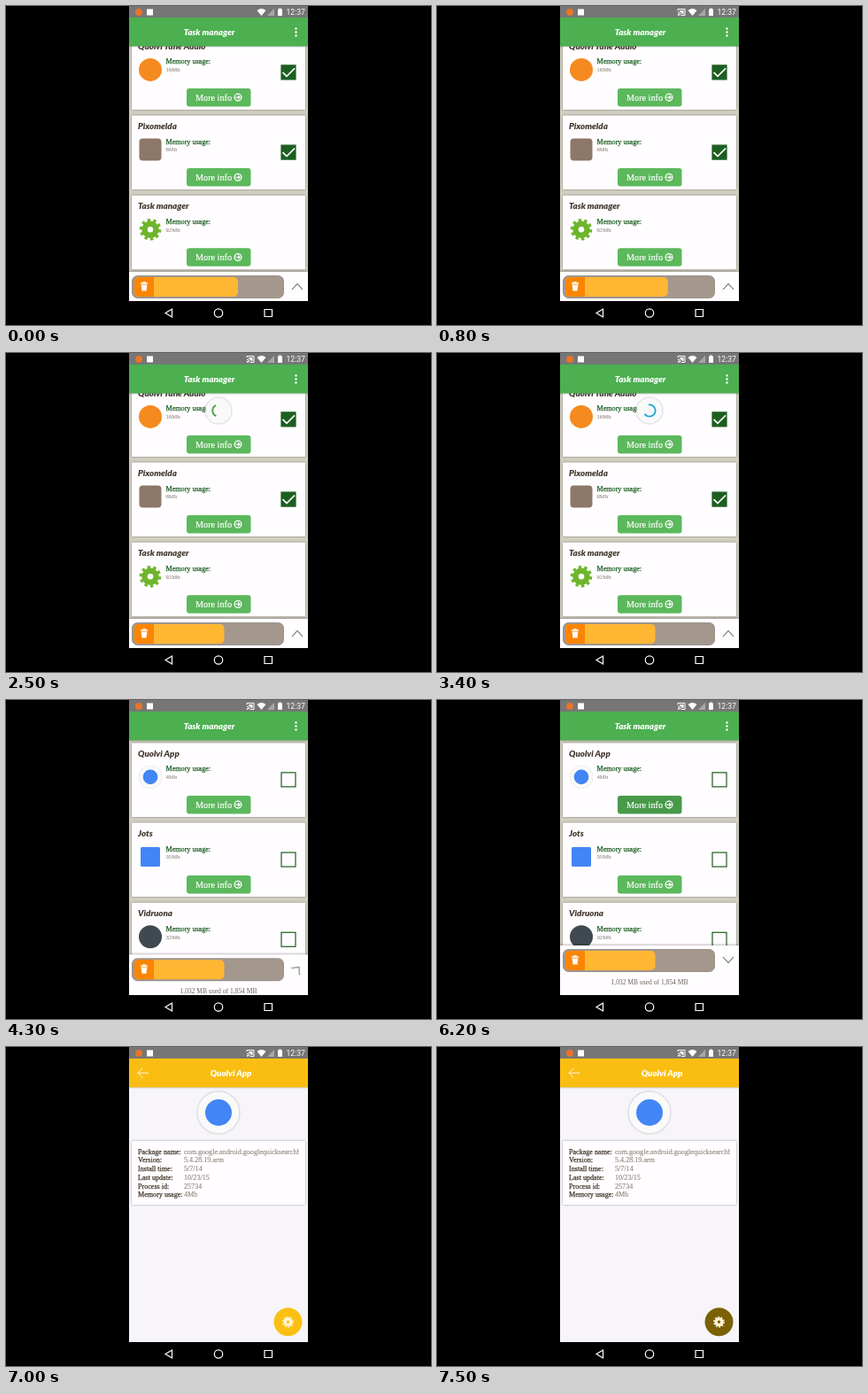
An HTML page that plays this animation: 480x360 px, repeating every 8000 ms.

```html
<!DOCTYPE html>
<html lang="en">
<head>
<meta charset="utf-8">
<title>Task manager</title>
<style>
html, body { margin: 0; width: 100%; height: 100%; overflow: hidden; background: #000; }
svg { display: block; width: 100vw; height: 100vh; }
text { font: 8.1px "Liberation Serif", serif; }
.title { font: italic 900 9.75px Lato, sans-serif; fill: #44382c; }
.bar-title { fill: #fff; text-anchor: middle; }
.clock { font: 8.6px Roboto, sans-serif; fill: #fff; }
.label { fill: #1b5e20; stroke: #1b5e20; stroke-width: .25; }
.size { font-size: 6.7px; fill: #9c948c; stroke: #9c948c; stroke-width: .15; }
.more { font-size: 10.2px; fill: #fff; stroke: #fff; stroke-width: .2; }
.total { font-size: 7.55px; fill: #6b635c; text-anchor: middle; }
.key { fill: #44382c; stroke: #44382c; stroke-width: .25; }
.value { fill: #938a82; stroke: #938a82; stroke-width: .15; }
.card { fill: #fffdff; filter: drop-shadow(0 .8px 1.2px #0006); }
.raised { filter: drop-shadow(0 .8px 1.2px #0005); }
.line { fill: none; stroke: #fff; }

.cast, .before, .after, .used, .spinner, .arc, .panel, .chevron, .pressed,
.page, .hero, .details, .fab { animation: 8s linear infinite; }

.cast { animation-name: cast; }
@keyframes cast { 0%, 1.2% { opacity: 0 } 1.25%, 100% { opacity: 1 } }

.used { animation-name: used; }
@keyframes used {
  0%, 8.2% { width: 117px; animation-timing-function: ease-in-out }
  17.5%, 100% { width: 101.5px }
}

.before { animation-name: before; }
@keyframes before { 0%, 44.3% { visibility: visible } 44.4%, 100% { visibility: hidden } }
.after { animation-name: after; }
@keyframes after { 0%, 44.3% { visibility: hidden } 44.4%, 100% { visibility: visible } }

.spinner { animation-name: spinner; transform-origin: 240px 65px; }
@keyframes spinner {
  0%, 17.5% { transform: scale(0) }
  19.6%, 43.1% { transform: scale(1) }
  45.6%, 100% { transform: scale(0) }
}
.arc { animation-name: arc; }
@keyframes arc {
  0%, 18.125% { stroke: #3f9b46; stroke-dasharray: 5 355; stroke-dashoffset: -25 }
  20% { stroke-dasharray: 18 342; stroke-dashoffset: -30 }
  26.875% { stroke-dasharray: 270 90; stroke-dashoffset: -90 }
  34.9% { stroke: #3f9b46 }
  35% { stroke: #1da4dc; stroke-dasharray: 10 350; stroke-dashoffset: -300 }
  42.5% { stroke-dasharray: 245 115; stroke-dashoffset: -350 }
  46.25%, 100% { stroke: #1da4dc; stroke-dasharray: 255 105; stroke-dashoffset: -480 }
}

.panel { animation-name: panel; }
@keyframes panel {
  0%, 50.6% { transform: none; animation-timing-function: ease-out }
  58.75%, 100% { transform: translateY(-23px) }
}
.chevron { animation-name: chevron; transform-origin: 329px 316.5px; }
@keyframes chevron {
  0%, 50.6% { transform: none; animation-timing-function: cubic-bezier(.6, 0, .5, 1) }
  58.75%, 100% { transform: rotate(180deg) }
}

.pressed { animation-name: pressed; }
@keyframes pressed { 0%, 76.9% { fill: #5cb85c } 77.4%, 100% { fill: #489a49 } }

.page { animation-name: page; }
@keyframes page { 0%, 79.75% { opacity: 0 } 81%, 100% { opacity: 1 } }
.hero { animation-name: hero; }
@keyframes hero {
  0%, 80.9% { transform: translate(163px, 87px) scale(.553); animation-timing-function: cubic-bezier(.4, 0, .2, 1) }
  87.5%, 100% { transform: translate(240px, 74px) scale(1) }
}
.details { animation-name: details; }
@keyframes details {
  0%, 80.9% { transform: translateY(222px); animation-timing-function: cubic-bezier(.4, 0, .2, 1) }
  87.5%, 100% { transform: none }
}
.fab { animation-name: fab; }
@keyframes fab { 0%, 88.1% { fill: #fbc013 } 93.4%, 100% { fill: #7b6106 } }
</style>
</head>
<body>
<svg viewBox="0 0 480 360">
  <defs>
    <clipPath id="screen"><path d="M139 0h202v333h-202z"/></clipPath>
    <clipPath id="row"><path d="M142 100h189v90h-189z"/></clipPath>
    <g id="badge">
      <circle r="23.5" fill="#fafafa" class="raised"/>
      <circle r="15" fill="#4285f4"/>
    </g>
    <g id="gear" fill="none" stroke="currentColor">
      <circle r="6.5" stroke-width="6.5"/>
      <circle r="10.7" stroke-width="3.2" pathLength="20" stroke-dasharray="1 1"/>
    </g>
  </defs>
  <rect width="480" height="360"/>
  <g clip-path="url(#screen)">
    <rect x="139" width="202" height="333" fill="#d1cdc0"/>
    <g class="before" id="before"></g>
    <g class="after" id="after"></g>

    <g class="panel">
      <rect x="139" y="300" width="202" height="60" fill="#fffdff" style="filter:drop-shadow(0 -1px 1px #0004)"/>
      <rect x="142.5" y="304.5" width="171" height="25" rx="6" fill="#a4978d" stroke="#97918b"/>
      <rect class="used" x="145" y="306" width="117" height="22" rx="5" fill="#ffb733"/>
      <path d="M167 306h-17q-5 0-5 5v12q0 5 5 5h17z" fill="#fb8500"/>
      <path d="M152.6 314.6h6.8l-.9 6.9h-5zM152 312.2h8v1.5h-8zM154.4 311h3.2v1.2h-3.2z" fill="#fff"/>
      <path class="chevron" d="M323 320l6-6.5 6 6.5" fill="none" stroke="#666" stroke-width="1.1"/>
      <text class="total" x="240" y="343.6">1,032 MB used of 1,854 MB</text>
    </g>

    <g class="spinner">
      <circle cx="240" cy="65" r="14.5" fill="#f9f9f9" class="raised"/>
      <circle class="arc" cx="240" cy="65" r="6.7" fill="none" stroke-width="1.8" pathLength="360" transform="rotate(-90 240 65)"/>
    </g>

    <rect x="139" y="13" width="202" height="32.5" fill="#4caf50" class="raised"/>
    <text class="title bar-title" x="229.5" y="32.7">Task manager</text>
    <g fill="#fff"><circle cx="327.5" cy="25.5" r="1.2"/><circle cx="327.5" cy="29.5" r="1.2"/><circle cx="327.5" cy="33.5" r="1.2"/></g>

    <g class="page">
      <rect x="139" y="13" width="202" height="320" fill="#f7f5f9"/>
      <g class="details" id="details"><rect class="card" x="142" y="106" width="196" height="72" rx="1"/></g>
      <use href="#badge" class="hero"/>
      <rect x="139" y="13" width="202" height="32.5" fill="#fabe12" class="raised"/>
      <path class="line" opacity=".85" d="M161 29.3h-12m5.5-5.5l-5.5 5.5 5.5 5.5"/>
      <text class="title bar-title" x="254" y="32.7">Quolvi App</text>
      <circle class="fab" cx="318.5" cy="310.3" r="16"/>
      <use href="#gear" color="#fff4d6" transform="translate(318.5 310.3) scale(.52)"/>
    </g>

    <rect x="139" width="202" height="13" fill="#767676"/>
    <circle cx="150" cy="7" r="4" fill="#e8742c"/>
    <rect x="159" y="3.5" width="7" height="7" fill="#fff"/>
    <g class="cast">
      <path class="line" d="M272 5.5v-2h8v7h-4M272 7.3q3 0 3.2 3.2"/>
      <path d="M272 9h1.7v1.8H272zM274 5h4.5v4H277q-1-2-3-2.500z" fill="#fff"/>
    </g>
    <path d="M283.5 5q5-4 10 0l-5 6z" fill="#fff"/>
    <path d="M303 2.7v8.3h-8z" fill="#a6a6a6"/>
    <path d="M307 3.6h1.4v-1h2.2v1h1.4V11h-5z" fill="#fff"/>
    <text class="clock" x="316.5" y="10">12:37</text>
  </g>

  <g class="line" stroke-width="1.2">
    <path d="M187.5 342l-7.5 4.5 7.5 4.5z"/>
    <circle cx="240" cy="346.5" r="4.7"/>
    <path d="M292 342.5h8.5v8h-8.5z"/>
  </g>
</svg>
<script>
const icons = {
  orange: '<circle r="13" fill="#f58a1f"/>',
  brown: '<rect x="-12.5" y="-12.5" width="25" height="25" rx="4" fill="#8d7768"/>',
  gear: '<use href="#gear" color="#6fb52c"/>',
  badge: '<use href="#badge" transform="scale(.553)"/>',
  blue: '<rect x="-11" y="-11" width="22" height="22" rx="1.5" fill="#4285f4"/>',
  dark: '<circle r="13" fill="#414950"/>'
};

const checkbox = checked => `
  <rect x="311" y="33.5" width="16" height="16" fill="${checked ? '#1b5e20' : 'none'}" stroke="#1b5e20" stroke-width="1.2"/>
  ${checked ? '<path class="line" stroke-width="1.7" d="M312.5 41.5l4.5 4.5 9-9"/>' : ''}`;

const card = (top, { name, size, icon, box = '', button = '' }) => `
  <g transform="translate(0 ${top})">
    <rect class="card" x="142" width="196" height="83.5" rx="1"/>
    <text class="title" x="149" y="15.5">${name}</text>
    <g transform="translate(163 38.5)">${icons[icon]}</g>
    <text class="label" x="180.5" y="32">Memory usage:</text>
    <text class="size" x="180.5" y="40.9">${size}Mb</text>
    ${box}
    <rect class="${button}" x="204" y="59.5" width="72.5" height="20.5" rx="3" fill="#5cb85c"/>
    <text class="more" x="214" y="73.3">More info</text>
    <circle class="line" cx="262" cy="69.7" r="3.9" stroke-width="1.3"/>
    <path class="line" stroke-width="1.2" d="M259.5 69.7h4.5m-1.8-2l2 2-2 2"/>
  </g>`;

const fillList = (id, top, apps) => {
  document.getElementById(id).innerHTML =
    apps.map((app, i) => card(top + i * 90.2, app)).join('');
};

fillList('before', 33.4, [
  { name: 'Quolvi Tune Audio', size: 16, icon: 'orange', box: checkbox(true) },
  { name: 'Pixomelda', size: 6, icon: 'brown', box: checkbox(true) },
  { name: 'Task manager', size: 92, icon: 'gear' }
]);
fillList('after', 48.4, [
  { name: 'Quolvi App', size: 4, icon: 'badge', box: checkbox(false), button: 'pressed' },
  { name: 'Jots', size: 35, icon: 'blue', box: checkbox(false) },
  { name: 'Vidruona', size: 32, icon: 'dark', box: checkbox(false) }
]);

const facts = [
  ['Package name:', 'com.google.android.googlequicksearchbox'],
  ['Version:', '5.4.28.19.arm'],
  ['Install time:', '5/7/14'],
  ['Last update:', '10/23/15'],
  ['Process id:', '25734'],
  ['Memory usage:', '4Mb']
];
document.getElementById('details').innerHTML += '<g clip-path="url(#row)">' +
  facts.map(([key, value], i) => {
    const y = 120.6 + i * 9.75;
    return `<text class="key" x="149" y="${y}">${key}</text><text class="value" x="201" y="${y}">${value}</text>`;
  }).join('') + '</g>';
</script>
</body>
</html>
```
